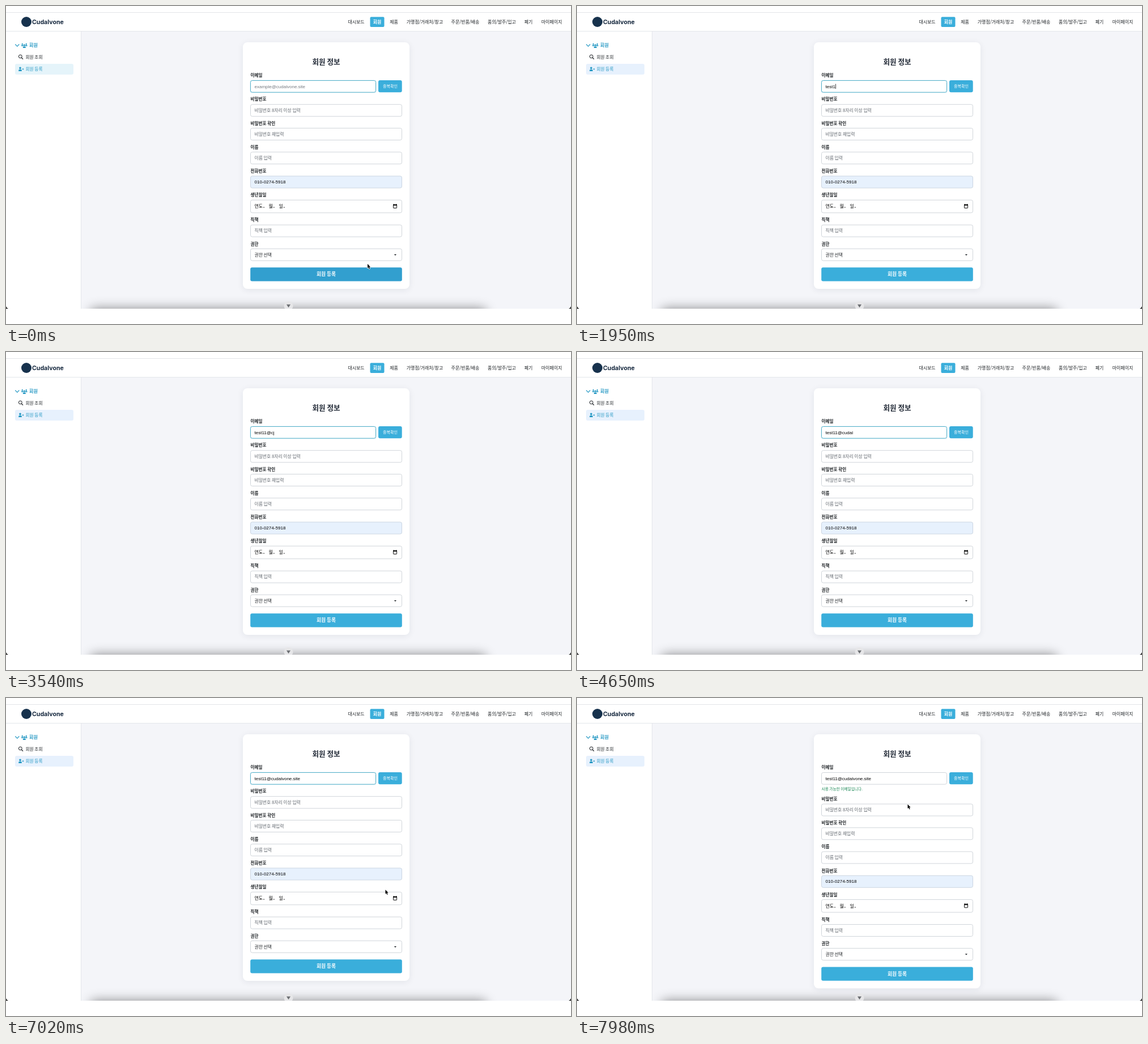
These frames come from a looping animation (997x561 px, 8000 ms). An HTML page with a canvas:

```html
<!DOCTYPE html>
<html lang="ko">
<head>
<meta charset="utf-8">
<title>회원 정보</title>
<style>
html, body { margin: 0; width: 100%; height: 100%; overflow: hidden; background: #fff; }
canvas { display: block; width: 997px; height: 561px; }
</style>
</head>
<body>
<canvas id="stage" width="997" height="561"></canvas>
<script>
const ctx = document.getElementById('stage').getContext('2d');
const LOOP = 8000;
const KO = '"Noto Sans CJK KR", "Noto Sans CJK", sans-serif';
const ARIAL = '"Liberation Sans", Arial, sans-serif';
const INTER = 'Inter, sans-serif';
const BLUE = [58, 174, 219], INK = '#1c2024', GREY = '#62686f', LINE = '#d0d5da';
const SITE = 'cudalvone';

// '<' is a backspace
const KEYS = `test11@cj<${SITE.slice(1)}.site`;
const KEY_TIMES = [600, 750, 960, 1290, 1680, 2250, 2550, 2760, 3000, 3780,
  4050, 4230, 4440, 4620, 4980, 5190, 5340, 5430, 5610, 5970, 6150, 6270, 6390];
const SHIFT_AT = 7620, CLICK_AT = 7440;

const clamp = v => Math.max(0, Math.min(1, v));
const span = (t, a, b) => clamp((t - a) / (b - a));
const ease = p => p * p * (3 - 2 * p);
const mix = (a, b, p) => `rgb(${a.map((v, i) => Math.round(v + (b[i] - v) * p))})`;

function text(s, x, y, size, { color = INK, weight = 400, align = 'left', font = KO } = {}) {
  ctx.font = `${weight} ${size}px ${font}`;
  ctx.textAlign = align;
  ctx.fillStyle = color;
  ctx.fillText(s, x, y + size * (font === KO ? 0.38 : 0.35));
  return ctx.measureText(s).width;
}

function rect(x, y, w, h, color) {
  ctx.fillStyle = color;
  ctx.fillRect(x, y, w, h);
}

function box(x, y, w, h, r, fill, stroke) {
  ctx.beginPath();
  ctx.roundRect(x, y, w, h, r);
  ctx.fillStyle = fill;
  ctx.fill();
  if (stroke) {
    ctx.strokeStyle = stroke;
    ctx.lineWidth = 1;
    ctx.stroke();
  }
}

function circle(x, y, r, color) {
  ctx.beginPath();
  ctx.arc(x, y, r, 0, Math.PI * 2);
  ctx.fillStyle = color;
  ctx.fill();
}

function path(points, color, width) {
  ctx.beginPath();
  points.forEach(([x, y]) => ctx.lineTo(x, y));
  if (width) {
    ctx.strokeStyle = color;
    ctx.lineWidth = width;
    ctx.stroke();
  } else {
    ctx.fillStyle = color;
    ctx.fill();
  }
}

function withShadow(color, blur, dy, draw) {
  ctx.save();
  ctx.shadowColor = color;
  ctx.shadowBlur = blur;
  ctx.shadowOffsetY = dy;
  draw();
  ctx.restore();
}

function person(x, y, s, color) {
  circle(x, y - 2 * s, 1.9 * s, color);
  box(x - 3 * s, y + 0.6 * s, 6 * s, 3.2 * s, [2.2 * s, 2.2 * s, 0.4, 0.4], color);
}

function header() {
  rect(0, 0, 997, 45, '#fff');
  rect(0, 11, 997, 1, '#e3e5e8');
  rect(0, 44, 997, 1, '#e3e6ea');
  circle(36, 28, 9, '#17324d');
  text('Cudalvone', 46, 28, 10.6, { weight: 700, color: '#17293f', font: INTER });
  box(642.5, 19.3, 25, 17.7, 2, mix(BLUE, BLUE, 0));
  const items = [['대시보드', 618], ['회원', 655], ['제품', 684.5], ['가맹점/거래처/창고', 739],
    ['주문/반품/배송', 810.5], ['품의/발주/입고', 875], ['폐기', 922], ['마이페이지', 963]];
  items.forEach(([s, x], i) => text(s, x, 28, 7.9, {
    align: 'center', weight: i === 1 ? 700 : 500, color: i === 1 ? '#fff' : INK }));
}

function sidebar(t) {
  const blue = '#2799c4';
  rect(0, 45, 132, 489, '#fff');
  rect(132, 45, 1, 489, '#e3e6ea');
  path([[16.3, 67.5], [19.8, 71.2], [23.3, 67.5]], blue, 1.1);
  person(28.8, 68.4, 0.62, blue);
  person(35.8, 68.4, 0.62, blue);
  person(32.3, 70.8, 0.85, blue);
  text('회원', 41, 69, 8.1, { color: blue, weight: 700 });

  ctx.beginPath();
  ctx.arc(25.3, 89, 2.9, 0, Math.PI * 2);
  ctx.strokeStyle = INK;
  ctx.lineWidth = 1;
  ctx.stroke();
  path([[27.3, 91], [30, 93.8]], INK, 1.2);
  text('회원 조회', 34.5, 90, 7.7);

  box(16, 102, 103, 19, 3, t < 450 ? '#e5f4fa' : '#e7f1fd');
  person(25, 111.3, 0.95, blue);
  path([[28.6, 111.3], [31.4, 111.3]], blue, 0.9);
  path([[30, 109.9], [30, 112.7]], blue, 0.9);
  text('회원 등록', 34.5, 111.5, 7.7, { color: blue });
}

function typed(t) {
  let s = '';
  KEY_TIMES.forEach((at, i) => {
    if (t >= at) s = KEYS[i] === '<' ? s.slice(0, -1) : s + KEYS[i];
  });
  return s;
}

function label(s, y) {
  text(s, 431.5, y, 7.6, { weight: 700 });
}

function email(t, hover) {
  const focus = t < CLICK_AT, value = typed(t);
  label('이메일', 122.5);
  if (focus) box(430.5, 130.5, 223, 23, 4, 'rgba(58,174,219,.18)');
  box(431.5, 131.5, 221, 20.7, 3, '#fff', focus ? '#55b0c8' : LINE);
  const w = text(value || `example@${SITE}.site`, 438.5, 141.7, 8,
    { font: ARIAL, color: value ? '#000' : '#757b82' });
  if (value && value.length < 6) rect(438.8 + w, 137.5, 0.8, 8.5, '#111');
  box(657, 131, 41.7, 21.3, 3, mix(BLUE, [27, 137, 191], hover));
  text('중복확인', 678, 141.7, 7.1, { color: '#fff', weight: 500, align: 'center' });
}

function field(name, labelY, y, value, h = 21) {
  label(name, labelY);
  const phone = name === '전화번호';
  box(431.5, y, 267, h, 3, phone ? '#e7f1fd' : '#fff', phone ? '#ccd6e2' : LINE);
  const mid = y + h / 2 - 0.2;
  if (phone) text(value, 438.5, mid, 8.1, { font: ARIAL, color: '#000' });
  else if (value) text(value, 438.5, mid, 7.8, { color: name === '권한' ? INK : GREY });
}

function form(t) {
  field('비밀번호', 164.5, 173.7, '비밀번호 8자리 이상 입력');
  field('비밀번호 확인', 207, 215.5, '비밀번호 재입력');
  field('이름', 249, 257.7, '이름 입력');
  field('전화번호', 291.5, 300, '010-0274-5918');
  field('생년월일', 333.5, 342.3, '', 22.5);
  [['연도', 438.5], ['월', 463.5], ['일', 481.5]].forEach(([s, x]) => {
    const w = text(s, x, 353.3, 8, { color: '#000' });
    text('.', x + w + 0.6, 353.3, 8, { color: '#000', weight: 700 });
  });
  box(683.5, 350.5, 6, 6, 0.6, '#fff', '#111');
  rect(683, 350, 7, 2, '#111');
  rect(684, 349, 1, 1, '#111');
  rect(688, 349, 1, 1, '#111');
  field('직책', 377.5, 386.2, '직책 입력');
  field('권한', 420, 428.3, '권한 선택');
  path([[684.8, 438], [689, 438], [686.9, 440.2]], INK);
  box(431.2, 461.2, 267.6, 24.2, 3, mix([50, 159, 207], BLUE, span(t, 450, 600)));
  text('회원 등록', 565, 473, 8.7, { color: '#fff', weight: 700, align: 'center' });
}

function suggestions() {
  withShadow('rgba(0,0,0,.3)', 4, 1, () => box(487, 158, 108, 104, 3, '#fdfdfd'));
  [`test@${SITE}.site`, `test@${SITE}.com`, ...['01', '02', '03'].map(n => `test${n}@${SITE}.site`)]
    .forEach((s, i) => text(s, 493, 169.8 + i * 20, 6.9, { font: INTER, weight: 600, color: '#1c1c1e' }));
}

function dock() {
  ctx.save();
  ctx.beginPath();
  ctx.rect(133, 500, 864, 34);
  ctx.clip();
  withShadow('rgba(0,0,0,.45)', 20, 0, () => box(149, 534, 698, 40, 8, '#fff'));
  circle(498.5, 529, 8, '#e6e6e8');
  path([[495, 526.5], [502, 526.5], [498.5, 532]], '#6b6e72');
  ctx.restore();
  rect(0, 534, 997, 27, '#fff');
  path([[0, 529.5], [1.2, 532.3], [4, 534], [0, 534]], '#000');
  path([[997, 529.5], [995.8, 532.3], [993, 534], [997, 534]], '#000');
}

function pointer(t) {
  if (t < 450) return [638, 455];
  if (t < 6720) return null;
  if (t < 7560) {
    const p = ease(span(t, 6720, 7440));
    return [638 + 39 * p + 18 * Math.sin(Math.PI * p), 455 - 309 * p];
  }
  const p = ease(span(t, 7560, 7980));
  return [677 - 93.5 * p, 146 + 41.5 * p];
}

function arrow([x, y]) {
  ctx.save();
  ctx.translate(x, y);
  const shape = [[0, 0], [0, 7.6], [1.7, 6.1], [2.9, 8.9], [4.2, 8.3], [3, 5.6], [5.2, 5.4], [0, 0]];
  ctx.lineJoin = 'round';
  path(shape, '#fff', 1.3);
  path(shape, '#000');
  ctx.restore();
}

function draw(t) {
  const done = t >= SHIFT_AT, dy = done ? 13.3 : 0;
  const hover = span(t, 7320, 7440) * (1 - span(t, 7700, 7850));
  rect(0, 0, 997, 561, '#f4f5f9');
  header();
  sidebar(t);
  withShadow('rgba(30,40,60,.08)', 12, 2, () => box(418, 64, 294, 435 + dy, 8, '#fff'));
  text('회원 정보', 565, 98, 12.6, { weight: 700, color: '#212936', align: 'center' });
  email(t, hover);
  if (done) text('사용 가능한 이메일입니다.', 431.5, 160, 6.7, { color: '#198754' });
  ctx.save();
  ctx.translate(0, dy);
  form(t);
  ctx.restore();
  if (t >= KEY_TIMES[0] && t < KEY_TIMES[4]) suggestions();
  dock();
  const at = pointer(t);
  if (at) arrow(at);
}

function tick() {
  draw(performance.now() % LOOP);
  requestAnimationFrame(tick);
}
tick();
</script>
</body>
</html>
```
